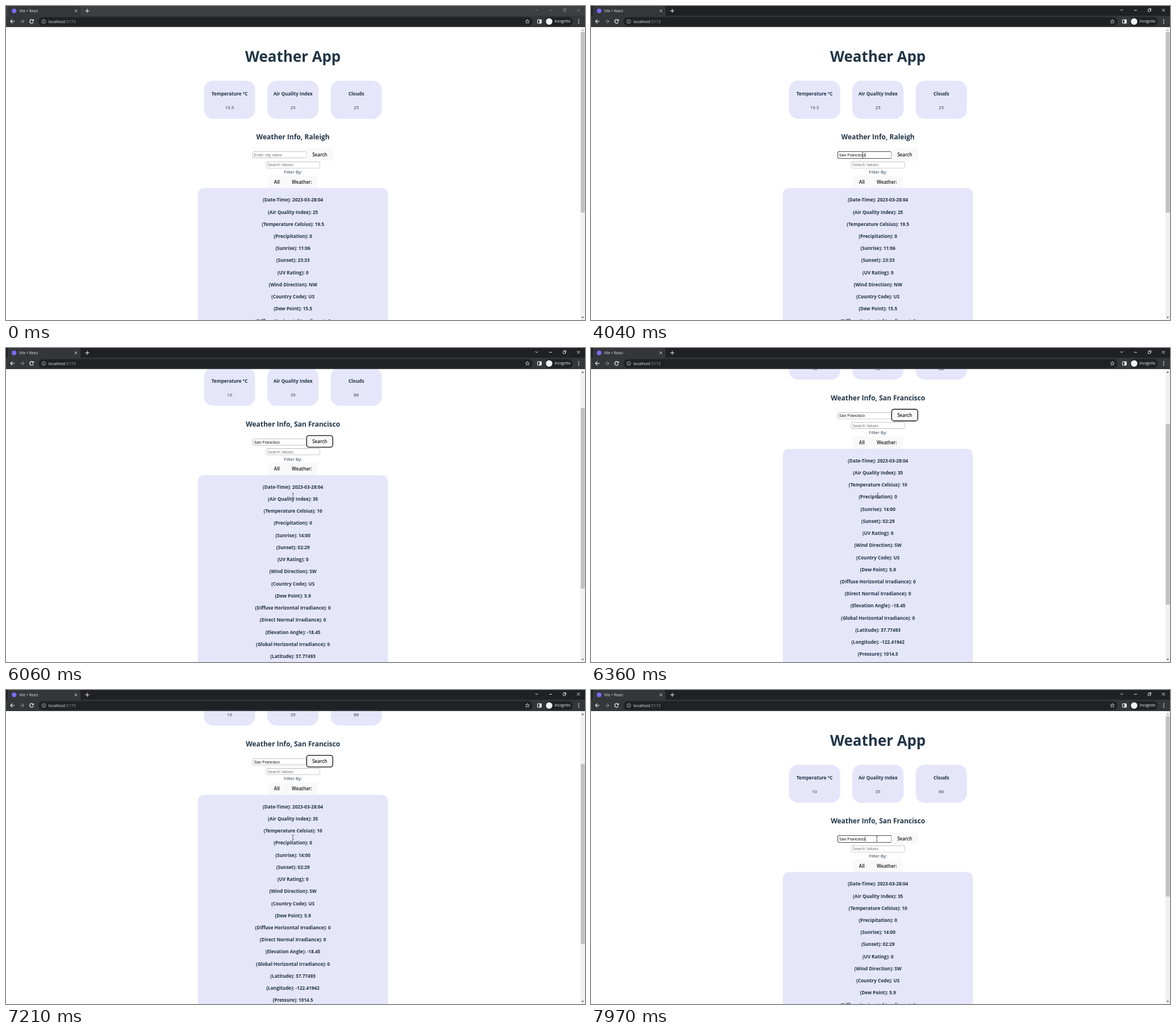
Write an HTML page with a canvas that moves like this. It is 1017 px wide and 551 px high and loops after 8 s.

```html
<!DOCTYPE html>
<html lang="en">
<head>
<meta charset="utf-8">
<title>Weather App</title>
<style>
html, body { margin: 0; width: 100%; height: 100%; overflow: hidden; background: #fff; }
canvas { display: block; }
</style>
</head>
<body>
<canvas id="stage" width="1017" height="551"></canvas>
<script>
const ctx = document.getElementById('stage').getContext('2d');
const W = 1017, H = 551, LOOP = 8000, TOP = 37, MID = 504;
const INK = '#213547', LAVENDER = '#e6e6fa', BAR = '#35363a', DARK = '#202124';
const LIGHT = '#f1f3f4', DIM = '#85878a';
const UI = '"Open Sans", "Noto Sans", sans-serif';
const FORM = '"Liberation Sans", Arial, sans-serif';

const FOCUS = 1210, CARET = 1240, CLICK = 4560, LOADED = 4980, REFOCUS = 7800;
const NOTCH = 106, MAX_SCROLL = 292.5;
const CITY = 'San Francisco';

// Pointer glides: start, end, and where each one stops
const ENTER = { t: 340, x: 31, y: 166 };
const GLIDES = [
  [340, 540, 325, 180],
  [690, 1070, 474, 262],
  [3985, 4480, 561, 258],
  [5200, 5530, 504, 259],
  [7770, 7970, 502, 261]
];

const LABELS = ['Date-Time', 'Air Quality Index', 'Temperature Celsius', 'Precipitation',
  'Sunrise', 'Sunset', 'UV Rating', 'Wind Direction', 'Country Code', 'Dew Point',
  'Diffuse Horizontal Irradiance', 'Direct Normal Irradiance', 'Elevation Angle',
  'Global Horizontal Irradiance', 'Latitude', 'Longitude', 'Pressure', 'Relative Humidity',
  'Sea Level Pressure', 'Snow', 'Solar Radiance', 'Station', 'Visibility'];
const RALEIGH = {
  cards: ['19.5', '25', '25'],
  rows: '2023-03-28:04 25 19.5 0 11:06 23:33 0 NW US 15.5 0'.split(' ')
};
const SF = {
  cards: ['10', '35', '86'],
  rows: ('2023-03-28:04 35 10 0 14:00 02:29 0 SW US 5.9 0 0 -18.45 0 37.77493 ' +
    '-122.41942 1014.5 77 1021.91125 0 0 F4637 16').split(' ')
};

const smooth = u => u * u * (3 - 2 * u);
const inOut = u => u < .5 ? 2 * u * u : 1 - 2 * (1 - u) ** 2;
const span = (t, a, b) => Math.max(0, Math.min(1, (t - a) / (b - a)));

// The two words are typed at an even pace each
const keyTime = i => i < 4 ? 1950 + 123 * i : 2420 + 147 * (i - 4);
const keysAt = t => [...CITY].filter((c, i) => t >= keyTime(i)).length;

// Font size at which a sample line takes up the given room
function sizeFor(weight, sample, room) {
  ctx.font = `${weight} 100px ${UI}`;
  return 100 * room / ctx.measureText(sample).width;
}
const BOLD = sizeFor(700, '(Global Horizontal Irradiance): 0', 130);
const BODY = sizeFor(400, 'Filter By:', 32);
const BUTTON = sizeFor(600, 'Weather:', 35.5);
const H1 = sizeFor(700, 'Weather App', 168);
const H2 = sizeFor(700, 'Weather Info, San Francisco', 166);

function text(str, x, y, size, weight = 400, color = INK, align = 'center', family = UI) {
  ctx.font = `${weight} ${size}px ${family}`;
  ctx.fillStyle = color;
  ctx.textAlign = align;
  ctx.fillText(str, x, y + size * .4);
}

function paint(fill, stroke, line) {
  if (stroke) { ctx.strokeStyle = stroke; ctx.lineWidth = line; ctx.stroke(); }
  if (fill) { ctx.fillStyle = fill; ctx.fill(); }
}

function box(x, y, w, h, r, fill, stroke, line = 1) {
  ctx.beginPath();
  ctx.roundRect(x, y, w, h, r);
  paint(fill, stroke, line);
}

function disc(x, y, r, fill, stroke, line = .8) {
  ctx.beginPath();
  ctx.arc(x, y, r, 0, 7);
  paint(fill, stroke, line);
}

function poly(points, fill, stroke, line = .8) {
  ctx.beginPath();
  for (const [x, y] of points) ctx.lineTo(x, y);
  ctx.closePath();
  paint(fill, stroke, line);
}

function line(color, width, ...points) {
  ctx.beginPath();
  for (const [x, y] of points) ctx.lineTo(x, y);
  paint(null, color, width);
}

function cross(x, y, r, color) {
  line(color, .9, [x - r, y - r], [x + r, y + r]);
  line(color, .9, [x + r, y - r], [x - r, y + r]);
}

function arrow(x, y, dir, color) {
  line(color, 1.1, [x - 3.5 * dir, y], [x + 3.5 * dir, y]);
  line(color, 1.1, [x + .2 * dir, y - 3.3], [x + 3.5 * dir, y], [x + .2 * dir, y + 3.3]);
}

function scrollAt(t) {
  if (t < 6250) return NOTCH * inOut(span(t, 5730, 6150));
  if (t < 7000) return NOTCH + (MAX_SCROLL - NOTCH) * smooth(span(t, 6290, 6540));
  return MAX_SCROLL * (1 - span(t, 7060, 7560)) ** 2.14;
}

function pointerAt(t) {
  let { x, y } = ENTER;
  for (const [from, to, tx, ty] of GLIDES) {
    const u = smooth(span(t, from, to));
    x += (tx - x) * u;
    y += (ty - y) * u;
  }
  return [x, y];
}

function input(x, y, value, hint, focused) {
  if (focused) box(x, y, 93.5, 11, 1.5, '#fff', '#101010', 1.6);
  else box(x, y, 93.5, 10.5, 1, '#fff', '#7d7d7d', .9);
  text(value || hint, x + 2, y + 5.2, 7.07, 400, value ? '#111' : '#757575', 'left', FORM);
}

function button(label, x, y, w, focused) {
  box(x, y, w, 22, 4.3, '#f9f9f9');
  if (focused) box(x + .6, y + .7, w - 1.2, 20.5, 4, null, '#101010', 1.3);
  text(label, x + w / 2, y + 11.2, BUTTON, 600, '#1a1a1a');
}

function caret(t, typed) {
  const keys = keysAt(t);
  const last = t >= REFOCUS ? REFOCUS : keys ? keyTime(keys - 1) : CARET;
  if (t < last || (t - last) % 1000 >= 500) return;
  ctx.font = `7.07px ${FORM}`;
  ctx.fillStyle = '#111';
  ctx.fillRect(436 + ctx.measureText(typed).width, 257.5, .8, 8);
}

function page(t) {
  const data = t < LOADED ? RALEIGH : SF;
  const focused = (t >= FOCUS && t < CLICK) || t >= REFOCUS;
  const typed = CITY.slice(0, keysAt(t));

  text('Weather App', MID, 88, H1, 700);
  ['Temperature °C', 'Air Quality Index', 'Clouds'].forEach((name, i) => {
    const x = MID + 111.3 * (i - 1);
    box(x - 45, 131, 90, 67, 16, LAVENDER);
    text(name, x, 154, BOLD, 700);
    text(data.cards[i], x, 178, BODY);
  });

  text('Weather Info, ' + (t < CLICK ? 'Raleigh' : CITY), MID, 229.5, H2, 700);
  input(433.8, 256, typed, 'Enter city name', focused);
  button('Search', 527.5, 249.4, 47, t >= CLICK && t < REFOCUS);
  if (focused) caret(t, typed);
  input(457.3, 273.4, '', 'Search Values', false);
  text('Filter By:', MID, 290.8, BODY);
  button('All', 460, 297.5, 31.5);
  button('Weather:', 491.5, 297.5, 56.5);

  box(337, 319.5, 334, 507, 10.5, LAVENDER);
  data.rows.forEach((v, i) =>
    text(`(${LABELS[i]}): ${v}`, MID, 340 + 21.227 * i, BOLD, 700));
}

function scrollbar(scroll) {
  const tip = (y, dir, on) =>
    poly([[1010.8, y - dir], [1013, y + 1.5 * dir], [1015.2, y - dir]], on ? '#505050' : '#a3a3a3');
  box(1009, TOP, 8, H - TOP, 0, '#f1f1f1');
  box(1009.5, 46 + scroll * .6155, 7, 316.5, 0, '#c1c1c1');
  tip(42.5, -1, scroll > 0);
  tip(546.5, 1, scroll < MAX_SCROLL);
}

function titleBar(active) {
  const ctl = active ? '#f1f1f1' : DIM;
  box(0, 0, W, 18, 0, active ? DARK : '#3c4043');
  box(3, 0, 128, 22, 4, BAR);
  disc(14.3, 8.5, 4, '#7b6cff');
  text('Vite + React', 23, 8.3, 6.2, 400, '#dfe1e5', 'left');
  cross(122.7, 8.5, 2.1, LIGHT);
  line(LIGHT, 1, [139.3, 8.5], [146.3, 8.5]);
  line(LIGHT, 1, [142.8, 5], [142.8, 12]);

  line(ctl, .9, [929.5, 5.8], [932, 8.3], [934.5, 5.8]);
  line(ctl, .9, [954, 7.5], [959, 7.5]);
  box(978.5, 5.8, 4, 4, 0, null, ctl, .8);
  line(ctl, .8, [979.8, 4.6], [983.6, 4.6], [983.6, 8.4]);
  cross(1005.5, 7.3, 2.5, ctl);
}

function toolbar() {
  box(0, 17, W, TOP - 17, 0, BAR);
  arrow(11.4, 27, -1, LIGHT);
  arrow(28, 27, 1, DIM);
  ctx.beginPath();
  ctx.arc(45, 27, 3.2, .4, 5.5);
  paint(null, LIGHT, 1.2);
  poly([[48.8, 23], [48.8, 26.6], [45.2, 26.6]], LIGHT);

  box(57, 19.5, 868, 15.5, 7.75, DARK);
  disc(66.3, 27.2, 3.3, null, '#c4c7c9');
  line('#c4c7c9', .9, [66.3, 26.7], [66.3, 29]);
  line('#c4c7c9', .9, [66.3, 25.2], [66.3, 26]);
  text('localhost', 74.5, 26.8, 7.1, 400, '#e8eaed', 'left');
  text(':5173', 74.5 + ctx.measureText('localhost').width, 26.8, 7.1, 400, '#9aa0a6', 'left');

  const star = Array.from({ length: 10 }, (_, i) => {
    const r = i % 2 ? 1.6 : 3.8, a = Math.PI * (i / 5 - .5);
    return [915.8 + r * Math.cos(a), 27.3 + r * Math.sin(a)];
  });
  poly(star, null, '#d5d7da');
  box(933.7, 24, 6.6, 6.2, .8, null, LIGHT, 1.1);
  box(937, 24, 3.3, 6.2, 0, LIGHT);
  box(946.5, 19.5, 49, 15.5, 7.75, DARK);
  disc(954, 27.2, 5.7, LIGHT);
  text('Incognito', 963.5, 26.8, 6.4, 400, LIGHT, 'left');
  for (let i = -1; i < 2; i++) disc(1006, 27.2 + 3 * i, .85, LIGHT);
}

function beam() {
  line('#333', .7, [0, -4], [0, 4]);
  for (const y of [-4.2, 4.2]) line('#333', .7, [-1.6, y], [1.6, y]);
}

function hand() {
  box(-3, 4.2, 7.4, 6.6, 2, '#fff', '#111', 1.2);
  box(-.9, 0, 1.8, 7, .9, '#fff', '#111', 1.2);
  box(-2.6, 4.6, 6.6, 5.8, 2, '#fff');
}

function pointer(t) {
  if (t < ENTER.t) return;
  const [x, y] = pointerAt(t);
  const inField = x > 434 && x < 528 && y > 255 && y < 268;
  ctx.save();
  ctx.translate(x, y);
  if (inField) beam();
  else if (x >= 528) hand();
  else poly([[0, 0], [0, 9], [2.1, 7.1], [3.5, 10.3], [4.9, 9.7], [3.5, 6.5], [6.2, 6.4]],
    '#fff', '#111', 1.2);
  ctx.restore();
}

function draw(t) {
  const scroll = scrollAt(t);
  box(0, 0, W, H, 0, '#fff');
  ctx.save();
  ctx.translate(0, -scroll);
  page(t);
  ctx.restore();
  scrollbar(scroll);
  titleBar(t >= FOCUS);
  toolbar();
  pointer(t);
}

const start = performance.now();
function tick(now) {
  draw(Math.max(0, now - start) % LOOP);
  requestAnimationFrame(tick);
}
draw(0);
requestAnimationFrame(tick);
</script>
</body>
</html>
```
